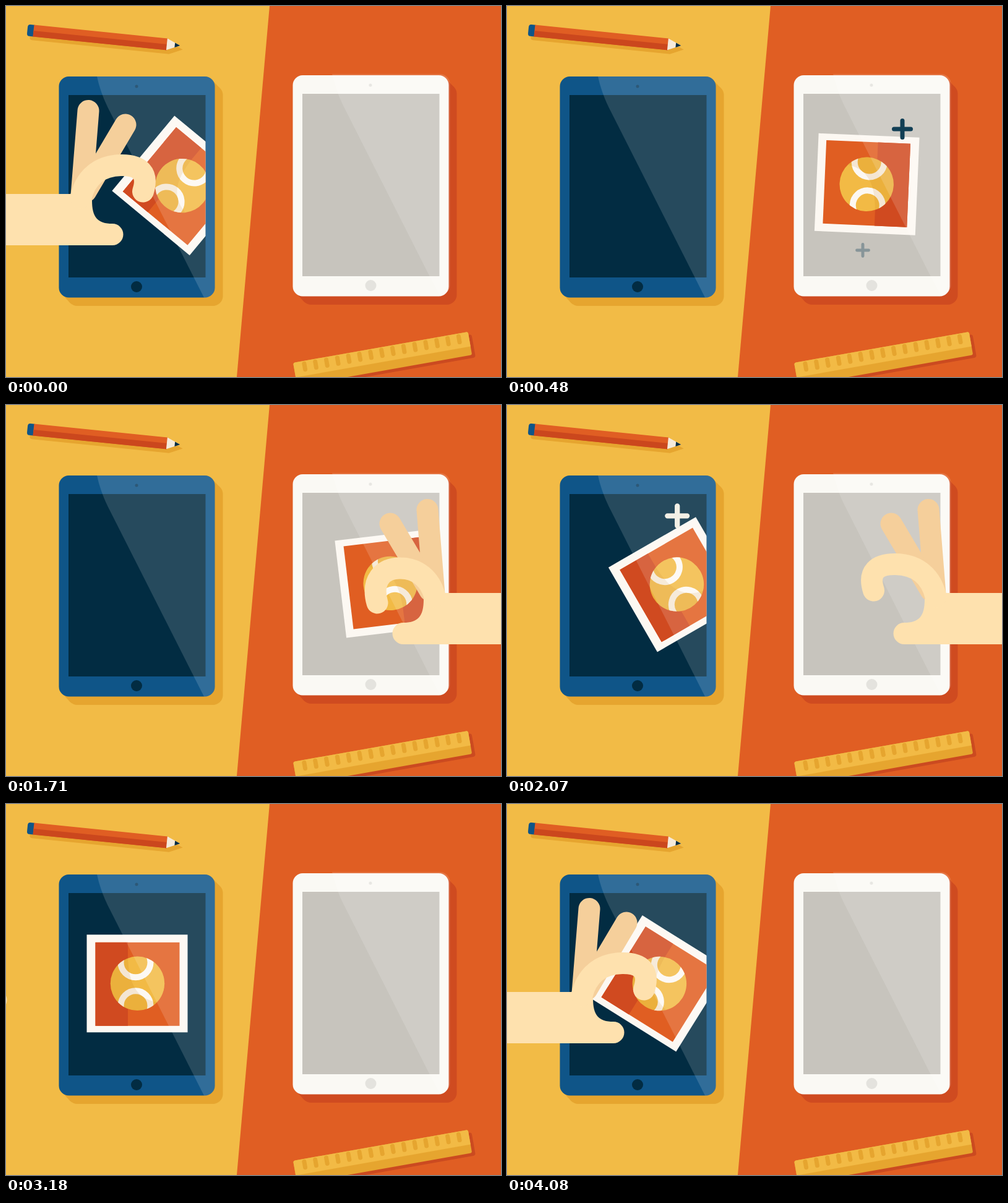
An HTML page that plays this animation: 800x600 px, repeating every 4.11 s.

```html
<!DOCTYPE html>
<html lang="en">
<head>
<meta charset="utf-8">
<title>Tablet toss</title>
<style>
  html, body { margin: 0; width: 100%; height: 100%; overflow: hidden; background: #f2bb46; }
  svg { display: block; width: 100%; height: 100%; }
</style>
</head>
<body>
<svg viewBox="0 0 800 600">
  <defs>
    <clipPath id="leftScreen"><rect x="101" y="144" width="221.5" height="295"/></clipPath>
    <clipPath id="rightScreen"><rect x="479" y="142" width="221" height="295"/></clipPath>
    <clipPath id="ballClip"><circle cx=".5" r="43.7"/></clipPath>

    <g id="shadow">
      <rect x="99" y="128" width="251.5" height="357" rx="16"/>
      <path d="M332.3 118.7L345.5 132.7L103.7 480.3L90.7 466.3Z"/>
    </g>
    <rect id="body" x="85.5" y="114" width="252" height="357.5" rx="16"/>
    <rect id="screen" x="101" y="144" width="221.5" height="295"/>
    <path id="glare" fill="#fff" fill-opacity=".14"
      d="M147 114Q152 138 164 163L320 471.5H321.500A16 16 0 0 0 337.500 455.500V130A16 16 0 0 0 321.500 114Z"/>

    <g id="photo">
      <rect x="-81.500" y="-79" width="163" height="158" fill="#fcf8f2"/>
      <rect x="-67.500" y="-66.500" width="136" height="135" fill="#e05e22"/>
      <rect x="-67.500" y="-66.500" width="52.500" height="135" fill="#d04a20"/>
      <g clip-path="url(#ballClip)">
        <rect x="-45" y="-45" width="92" height="90" fill="#f2ba45"/>
        <g fill="none" stroke="#fcf8f2" stroke-width="10">
          <circle cx="-2.500" cy="-34" r="24"/>
          <circle cx="-2.500" cy="36" r="24"/>
        </g>
        <path d="M-45 -45H-15C-14 10 5 30 47 32V45H-45Z" fill="#b97000" fill-opacity=".13"/>
      </g>
    </g>

    <path id="plus" d="M-13.500 0H13.500M0 -13.500V13.500" fill="none" stroke-width="7" stroke-linecap="round"/>

    <g id="hand">
      <g stroke="#f5cf9b" stroke-width="35" stroke-linecap="round">
        <path d="M133 169.500L122 306"/>
        <path d="M193 192L129 300"/>
      </g>
      <path fill="#fee1ae" d="M-300 304H121L139 314C139 342 148 352 172 352A17.500 17.500 0 0 1 172 387H-300Z"/>
      <path class="index" fill="none" stroke="#fee1ae" stroke-width="35" stroke-linecap="round"/>
    </g>
  </defs>

  <rect width="800" height="600" fill="#f2bb46"/>
  <path d="M426 0H800V600H373Z" fill="#e05e23"/>

  <g transform="translate(44.500 40) rotate(5.800)">
    <path d="M-6 -9.500H216.500L238 0L216.500 9.500H-6Q-10 9.500 -10 5V-5Q-10 -9.500 -6 -9.500Z" fill="#e6a52f" transform="translate(5 6)"/>
    <path d="M1 -9.500H-6Q-10 -9.500 -10 -5V5Q-10 9.500 -6 9.500H1Z" fill="#0f5588"/>
    <rect y="-9.500" width="217" height="19" fill="#e05e23"/>
    <rect width="217" height="9.500" fill="#cb471d"/>
    <path d="M216.500 -9.500L238 0L216.500 9.500Z" fill="#f5eadb"/>
    <path d="M229.500 -3.800L238 0L229.500 3.800Z" fill="#022c42"/>
  </g>

  <g transform="translate(464 577) rotate(-10.050)">
    <rect x="5" y="5" width="287" height="38" rx="4" fill="#cb4a20"/>
    <rect width="287" height="38" rx="3" fill="#e6a52f"/>
    <path d="M3 0H284Q287 0 287 3V24H0V3Q0 0 3 0Z" fill="#f2ba45"/>
    <path id="ticks" stroke="#e6a52f" stroke-width="7" stroke-linecap="round"/>
  </g>

  <use href="#shadow" fill="#e6a52f"/>
  <use href="#body" fill="#0f5588"/>
  <use href="#screen" fill="#022c42"/>
  <circle cx="211" cy="130" r="2.500" fill="#0b3c60"/>
  <circle cx="211" cy="454" r="9" fill="#022c42"/>
  <g clip-path="url(#leftScreen)"><use href="#photo" id="leftPhoto"/></g>
  <use href="#glare"/>

  <g transform="translate(378 -2)">
    <use href="#shadow" fill="#cf4b20"/>
    <use href="#body" fill="#faf9f4"/>
    <use href="#screen" fill="#c7c4bd"/>
    <circle cx="211" cy="130" r="2.500" fill="#e4e3de"/>
    <circle cx="211.500" cy="454" r="9" fill="#e4e3de"/>
  </g>
  <g clip-path="url(#rightScreen)"><use href="#photo" id="rightPhoto"/></g>
  <use href="#glare" transform="translate(380 -4)"/>

  <use href="#plus" id="leftBig" stroke="#f3f0e6"/>
  <use href="#plus" id="leftSmall" stroke="#f3f0e6"/>
  <use href="#plus" id="rightBig" stroke="#123f55"/>
  <use href="#plus" id="rightSmall" stroke="#123f55"/>

  <use href="#hand" id="handUse"/>
</svg>
<script>
const LOOP = 4110;
const LEFT = 212, RIGHT = 586.7, GAP = RIGHT - LEFT;
const $ = id => document.getElementById(id);
const index = document.querySelector('.index');

// Toss: time since pull-back, travel, rotation
const TOSS = [
  [-30, 0, 0], [150, -35, 6.8], [240, -38, 8], [300, -20, 19], [330, 2.5, 25.5],
  [360, 34, 32], [390, 72.5, 39.7], [420, 124, 44], [450, 182, 45], [480, 250, 40],
  [510, GAP - 62, 30], [600, GAP - 35, 17], [690, GAP - 19, 9.3], [780, GAP - 10, 4.9],
  [870, GAP - 5, 2.46], [940, GAP, 0]
];
// Plus: time, scale, opacity
const BIG = [[150, 0, 0], [210, 1.18, 1], [270, 1, 1], [580, 1, 1], [680, .8, 0]];
const SMALL = [[440, .4, 0], [480, .7, .35], [560, 1.12, 1], [620, 1, 1], [720, .9, 0]];
// Index finger: time, then two cubic curves
const REACH = [128, 281, 150, 264, 178, 264, 208, 263, 232, 288, 254, 317];
const DRAG = [128, 281, 150, 264, 176, 264, 206, 263, 224, 285, 214, 320];
const FLICK = [128, 279, 150, 258, 186, 257.5, 216, 257, 231, 270, 221.5, 300];
const FINGER = [[-30, ...REACH], [150, ...DRAG], [240, ...DRAG], [330, ...FLICK]];

function sample(keys, t) {
  const next = keys.findIndex(k => k[0] > t);
  if (next === 0) return keys[0].slice(1);
  if (next < 0) return keys[keys.length - 1].slice(1);
  const a = keys[next - 1], b = keys[next];
  const u = (t - a[0]) / (b[0] - a[0]);
  return a.slice(1).map((v, i) => v + (b[i + 1] - v) * u);
}

function handRetreat(s) {
  if (s < -541) return 500;
  if (s < -140) return 270 * (1 - (s + 540) / 400) ** 2;
  if (s < 520) return 0;
  return Math.min(500, 300 * ((s - 520) / 240) ** 2);
}

function placePlus(id, x, y, keys, t) {
  const [scale, opacity] = sample(keys, t);
  $(id).setAttribute('transform', `translate(${x} ${y}) scale(${scale})`);
  $(id).setAttribute('opacity', opacity);
}

function draw(t) {
  const toLeft = t >= 1000 && t < 3000;
  const s = toLeft ? t - 1560 : t < 1000 ? t + LOOP - 3720 : t - 3720;
  const [travel, turn] = sample(TOSS, s);
  const x = toLeft ? RIGHT - travel : LEFT + travel;
  const angle = toLeft ? -turn : turn;
  $('leftPhoto').setAttribute('transform', `translate(${x} 290.3) rotate(${angle})`);
  $('rightPhoto').setAttribute('transform', `translate(${x} 288.3) rotate(${angle + 180})`);

  index.setAttribute('d', 'M121 310C' + sample(FINGER, s).join(' '));
  const mirror = toLeft ? 'translate(814 0) scale(-1 1) ' : '';
  $('handUse').setAttribute('transform', `${mirror}translate(${-handRetreat(s)} 0)`);

  placePlus('rightBig', 639, 199, BIG, t);
  placePlus('rightSmall', 575, 395, SMALL, t);
  placePlus('leftBig', 275.2, 179.3, BIG, t - 1860);
  placePlus('leftSmall', 132, 402.5, SMALL, t - 1860);
}

$('ticks').setAttribute('d',
  Array.from({ length: 15 }, (_, i) => `M${17.4 + i * 18.1} 4.500V14`).join(''));

const start = performance.now();
function tick() {
  const t = (performance.now() - start) % LOOP;
  draw(Math.floor(t / 30) * 30);
  requestAnimationFrame(tick);
}
tick();
</script>
</body>
</html>
```
